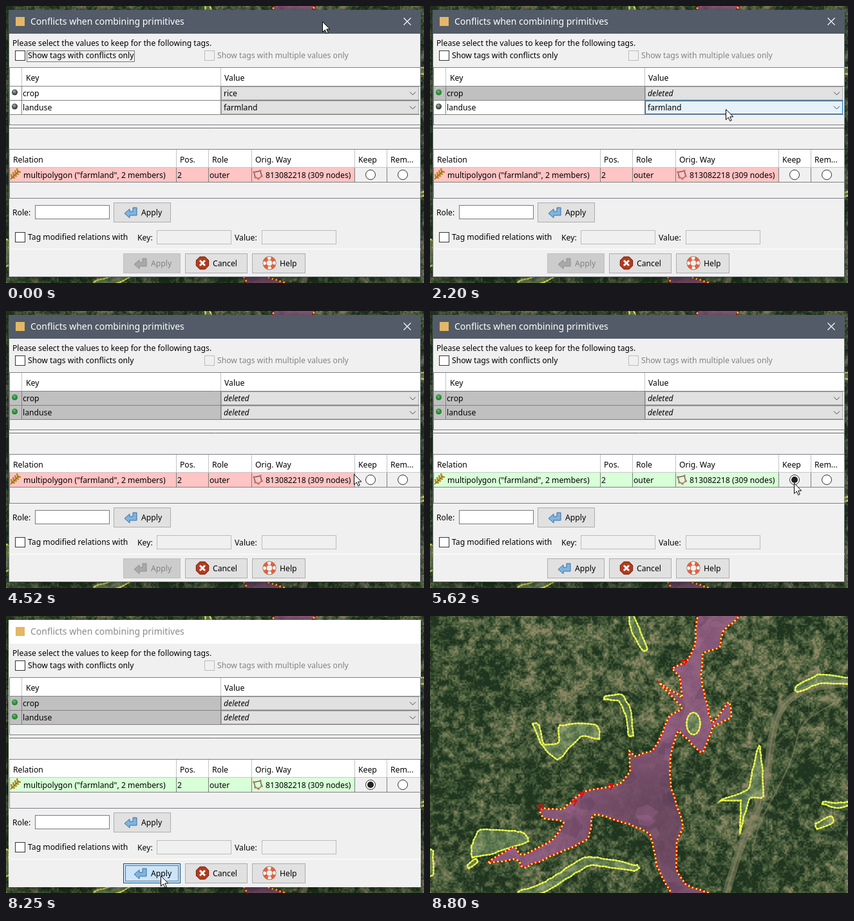
Write an HTML page with a canvas that moves like this. It is 649x430 px and loops after 9 s.

```html
<!DOCTYPE html>
<html lang="en">
<head>
<meta charset="utf-8">
<title>Conflicts when combining primitives</title>
<style>
html, body { margin: 0; width: 100%; height: 100%; overflow: hidden; background: #465539; }
canvas { display: block; }
</style>
</head>
<body>
<canvas id="stage" width="649" height="430"></canvas>
<script>
const W = 649, H = 430, LOOP = 9000, STEP = LOOP / 82;
const stage = document.getElementById('stage').getContext('2d');
const layer = () => Object.assign(document.createElement('canvas'), { width: W, height: H }).getContext('2d');
const land = layer(), dlg = layer();
const FONT = '12.2px "Noto Sans", sans-serif';
const BLUE = '#0078d7';

// ---------- Landscape ----------
function hash(x, y) {
  const s = Math.sin(x * 127.1 + y * 311.7) * 43758.5453;
  return s - Math.floor(s);
}
function noise(x, y) {
  const i = Math.floor(x), j = Math.floor(y);
  let u = x - i, v = y - j;
  u *= u * (3 - 2 * u);
  v *= v * (3 - 2 * v);
  const a = hash(i, j), b = hash(i + 1, j), c = hash(i, j + 1), d = hash(i + 1, j + 1);
  return a + (b - a) * u + (c - a + (a - b - c + d) * u) * v;
}
const shades = [[32, 53, 31], [76, 97, 61], [142, 136, 102]];   // trees, grass, soil

function paintLand() {
  const img = land.createImageData(W, H);
  for (let y = 0, p = 0; y < H; y++) for (let x = 0; x < W; x++, p += 4) {
    const v = .14 * noise(x / 80, y / 80) + .2 * noise(x / 26, y / 26)
            + .36 * noise(x / 8, y / 8) + .3 * noise(x / 2.5, y / 2.5);
    const t = Math.max(0, Math.min(1.99, (v - .35) * 4.6)), i = Math.floor(t);
    for (let c = 0; c < 3; c++) img.data[p + c] = shades[i][c] + (shades[i + 1][c] - shades[i][c]) * (t - i);
    img.data[p + 3] = 255;
  }
  land.putImageData(img, 0, 0);
  const road = (d, width) => {
    land.lineWidth = width;
    land.strokeStyle = 'rgba(140,135,105,.5)';
    land.stroke(new Path2D(d));
  };
  const river = 'M649 104C590 108 552 118 538 160S528 240 518 275S486 340 478 370L460 430';
  road(river, 12);
  road(river, 3);
  road('M649 125C600 150 575 160 570 190S545 260 528 290S505 340 500 370', 2);
  road('M250 308C290 305 330 330 345 350S352 390 375 430', 4);
}

const points = s => s.split(',').map(p => p.trim().split(' ').map(Number));

// Closed curve through the points, with small seeded bumps
function outline(pts, wobble = 1) {
  const path = new Path2D(), at = i => pts[(i + pts.length) % pts.length];
  pts.forEach((p, i) => {
    const q = at(i + 1), n = Math.ceil(Math.hypot(q[0] - p[0], q[1] - p[1]) / 7);
    for (let s = 0; s < n; s++) {
      const u = s / n, u2 = u * u, u3 = u2 * u;
      path.lineTo(...[0, 1].map(a =>
        p[a] * (2 * u3 - 3 * u2 + 1) + q[a] * (3 * u2 - 2 * u3)
        + .25 * (q[a] - at(i - 1)[a]) * (u3 - 2 * u2 + u) + .25 * (at(i + 2)[a] - p[a]) * (u3 - u2)
        + wobble * (hash(i + a * 50, s) * 2 - 1)));
    }
  });
  path.closePath();
  return path;
}
// Narrow field along a spine
function ribbon(width, spine) {
  const pts = points(spine), last = pts.length - 1;
  const side = sign => pts.map(([x, y], i) => {
    const a = pts[Math.max(0, i - 1)], b = pts[Math.min(last, i + 1)];
    const dx = b[0] - a[0], dy = b[1] - a[1], w = sign * width * (i % last ? 1 : .6) / Math.hypot(dx, dy);
    return [x - dy * w, y + dx * w];
  });
  return outline([...side(1), ...side(-1).reverse()]);
}

const bank = outline(points(`418 -3, 411 47, 397 72, 376 81, 387 95, 391 126, 356 104, 391 142, 372 155, 348 206,
  318 217, 309 209, 310 243, 292 261, 240 273, 205 299, 172 299, 175 313, 207 320, 190 348, 142 371, 130 358,
  90 383, 135 378, 147 390, 243 347, 254 309, 300 320, 342 340, 352 385, 378 433, 440 433, 400 418, 383 395,
  383 350, 393 325, 374 262, 374 220, 386 179, 422 212, 440 172, 467 158, 464 134, 438 165, 422 100, 424 58,
  450 48, 454 25, 482 -3`));
const pond = new Path2D();
pond.ellipse(409, 167, 10.5, 17, 0, 0, 7);
const fields = [
  ribbon(6, '312 -3, 319 22, 334 53'),
  ribbon(5, '271 127, 296 127, 308 152, 312 187'),
  outline(points('160 168, 170 170, 177 200, 200 196, 201 170, 257 168, 263 192, 235 186, 198 223, 172 198')),
  outline(points('65 358, 78 332, 140 335, 152 350, 105 366, 66 375')),
  ribbon(5, '59 390, 73 379'),
  ribbon(7, '138 432, 180 420, 245 381, 320 391'),
  outline(points('512 202, 518 280, 496 283, 481 336, 482 287, 450 287, 493 270, 500 240')),
  ribbon(7, '569 115, 603 98, 652 101'),
  ribbon(4, '610 290, 636 294, 652 291'),
  ribbon(8, '600 327, 625 315'),
  ribbon(6, '1 365, 1 402')
];

function dotted(path, color, gap) {
  stage.lineWidth = 2;
  stage.strokeStyle = color;
  stage.stroke(path);
  stage.lineWidth = 2.6;
  stage.strokeStyle = '#ffff3c';
  stage.setLineDash([2.4, gap]);
  stage.stroke(path);
  stage.setLineDash([]);
}

function drawField(path) {
  stage.fillStyle = 'rgba(165,200,140,.35)';
  stage.fill(path);
  dotted(path, '#d4ec62', 2.5);
}

function drawMap(merged) {
  const c = stage;
  c.drawImage(land.canvas, 0, 0);
  fields.forEach(drawField);
  c.save();
  c.clip(bank);
  const tint = c.createRadialGradient(355, 325, 40, 355, 325, 160);
  tint.addColorStop(0, 'rgba(114,72,102,.88)');
  tint.addColorStop(1, 'rgba(150,92,134,.85)');
  c.fillStyle = tint;
  c.fillRect(0, 0, W, H);
  for (let i = 0; i < 110; i++) {
    const x = 90 + hash(i, 1) * 390, y = hash(i, 2) * H, r = 8 + hash(i, 3) * 16;
    c.fillStyle = hash(i, 4) < .5 ? 'rgba(175,112,158,.25)' : 'rgba(80,54,82,.25)';
    c.beginPath();
    for (let a = 0; a < 5; a++) {
      const q = a * 1.257, s = r * (.6 + hash(i, a + 5) * .6);
      c.lineTo(x + s * Math.cos(q), y + s * .8 * Math.sin(q));
    }
    c.fill();
  }
  if (!merged) {
    c.fillStyle = 'rgba(190,85,60,.5)';
    c.fillRect(80, 255, 216, 140);
    c.strokeStyle = '#f00';
    c.lineWidth = 2;
    c.strokeRect(296, 255, 0, 65);
  }
  c.restore();
  c.save();
  c.clip(pond);
  c.drawImage(land.canvas, 0, 0);
  c.restore();
  drawField(pond);
  dotted(bank, '#f00000', 3.8);
  c.strokeStyle = '#f00000';
  c.lineWidth = 2;
  for (const p of ['399 68', '239 274', '228 286', '285 261', '175 293']) c.stroke(new Path2D(`M${p}l-10 2m10-2l-5 9`));
}

// ---------- Dialog ----------
function text(s, x, y, color = '#000', style = '') {
  dlg.font = style + ' ' + FONT;
  dlg.fillStyle = color;
  dlg.fillText(s, x, y);
}
function rect(x, y, w, h, fill, border) {
  dlg.fillStyle = fill;
  dlg.fillRect(x, y, w, h);
  if (!border) return;
  dlg.strokeStyle = border;
  dlg.lineWidth = 1;
  dlg.strokeRect(x + .5, y + .5, w - 1, h - 1);
}
function line(d, color, width = 1) {
  dlg.strokeStyle = color;
  dlg.lineWidth = width;
  dlg.stroke(new Path2D(d));
}
function focusRing(x, y, w, h) {
  dlg.setLineDash([1, 1]);
  line(`M${x + .5} ${y + .5}h${w}v${h}h${-w}z`, '#000');
  dlg.setLineDash([]);
}
function disc(x, y, r, fill, border, width = 1) {
  dlg.beginPath();
  dlg.arc(x, y, r, 0, 7);
  dlg.fillStyle = fill;
  dlg.fill();
  if (border) {
    dlg.strokeStyle = border;
    dlg.lineWidth = width;
    dlg.stroke();
  }
}
function checkbox(x, y, label, off) {
  rect(x, y, 16, 16, off ? '#f0f0f0' : '#fff', off ? '#bcbcbc' : '#333');
  text(label, x + 20, y + 12, off ? '#838383' : '#000');
}
function ball(x, y, on) {
  const g = dlg.createRadialGradient(x - 1, y - 2, 0, x, y, 5);
  g.addColorStop(0, on ? '#6cbf6c' : '#b4beb4');
  g.addColorStop(.9, on ? '#147d28' : '#26332a');
  disc(x, y, 4.5, g);
}
const looks = {
  normal: ['#e1e1e1', '#adadad'], off: ['#cccccc', '#bfbfbf'],
  hover: ['#e5f1fb', BLUE], down: ['#cce4f7', '#005499']
};
function button(x, y, w, label, icon, look = 'normal') {
  rect(x, y, w, 31, ...looks[look]);
  icon(x + 27, y + 15, look === 'off');
  text(label, x + 43, y + 20, look === 'off' ? '#838383' : '#000');
}
function returnIcon(x, y, off) {
  const p = new Path2D(`M${x - 10} ${y + 2}l8-7v4h5v-6h6v12h-11v4z`);
  dlg.fillStyle = off ? '#a9a9a9' : '#7db4e0';
  dlg.fill(p);
  dlg.strokeStyle = off ? '#8f8f8f' : '#3b6f9e';
  dlg.lineWidth = 1;
  dlg.stroke(p);
}
function cancelIcon(x, y) {
  dlg.beginPath();
  for (let i = 0; i < 8; i++) {
    const a = (i + .5) * Math.PI / 4;
    dlg.lineTo(x + 10.5 * Math.cos(a), y + 10.5 * Math.sin(a));
  }
  dlg.closePath();
  dlg.fillStyle = '#b5391c';
  dlg.fill();
  dlg.strokeStyle = '#6e1c0c';
  dlg.lineWidth = 1;
  dlg.stroke();
  line(`M${x - 4} ${y - 4}l8 8m0-8l-8 8`, '#fff', 3);
}
function helpIcon(x, y) {
  disc(x, y, 7.5, '#f0f0f0', '#a04a30', 6);
  disc(x, y, 7.5, 'transparent', '#fff', 4.5);
  dlg.strokeStyle = '#e2613c';
  dlg.lineWidth = 5;
  for (let i = 0; i < 4; i++) {
    dlg.beginPath();
    dlg.arc(x, y, 7.5, i * Math.PI / 2 + .3, i * Math.PI / 2 + 1.2);
    dlg.stroke();
  }
}
function radio(x, on) {
  disc(x, 262, 7.5, '#fff', '#333');
  if (on) disc(x, 262, 5, '#222');
}
function wheatIcon(x, y) {
  for (let i = 0; i < 4; i++) line(`M${x - 5 + i * 3} ${y + 4 - i * 3}l-1-5m1 5l5 1`, '#b98a1c', 2.5);
  line(`M${x - 7} ${y + 7}l13-13`, '#8a6414', 1.5);
}
function wayIcon(x, y) {
  const pts = points('-6 -4, 4 -6, 6 2, 1 6, -4 4').map(([a, b]) => [x + a, y + b]);
  line(`M${pts.join('L')}Z`, '#222');
  for (const [a, b] of pts) rect(a - 1.5, b - 1.5, 3, 3, '#fff', '#c33a28');
}

// state: '' untouched, 'edit' selected, 'deleted' value removed
function tagRow(y, key, value, state, hot) {
  const edit = state === 'edit', gone = state === 'deleted';
  rect(6, y, 327, 21, edit ? BLUE : gone ? '#c0c0c0' : '#fff');
  line(`M24.5 ${y}v21M333.5 ${y}v21M6 ${y + 21.5}H642`, '#808080');
  ball(13.5, y + 9, state);
  text(key, 26, y + 15, edit ? '#fff' : '#000');
  const hover = !state && hot(334, y, 307, 21);
  rect(334, y, 307, 21, ...edit ? ['#fff', BLUE] : looks[hover ? 'hover' : 'normal']);
  if (edit) rect(621, y, 20, 21, '#cce4f7', BLUE);
  text(gone ? 'deleted' : value, edit ? 337 : 338, y + 15, '#000', gone ? 'italic' : '');
  line(`M627 ${y + 8.5}l4.5 4.5 4.5-4.5`, '#444');
}
function dropdown(y, value, cursorY) {
  const second = cursorY >= y + 18;
  rect(334, y, 307, 34, '#fff', '#000');
  rect(335, y + (second ? 17 : 1), 305, 16, BLUE);
  text(value, 335.5, y + 14, second ? '#000' : '#fff');
  text('none', 335.5, y + 30, second ? '#fff' : '#000', 'italic bold');
}

function drawDialog(k) {
  const fading = k >= 75, kept = k >= 48, pressed = k >= 71, cursorY = cursorAt(k)[1];
  const [hx, hy] = cursorAt(k - 1);   // hover lags one step
  const hot = (x, y, w, h) => hx >= x && hx < x + w && hy >= y && hy < y + h;
  dlg.clearRect(0, 0, W, H);
  rect(4, 6, 640, 415, '#f0f0f0', fading ? '#f0f0f0' : '#5a626c');
  rect(4, 6, 640, 37, fading ? '#fff' : '#525b67');
  rect(15, 17, 14, 14, '#e3b766');
  dlg.font = '14px "Noto Sans", sans-serif';
  dlg.fillStyle = fading ? '#8a8a8a' : '#fff';
  dlg.fillText('Conflicts when combining primitives', 38, 29);
  line('M617.5 18.5l11 11m0-11l-11 11', '#fff', 1.2);

  text('Please select the values to keep for the following tags.', 10, 62);
  checkbox(14, 69, 'Show tags with conflicts only');
  checkbox(308, 69, 'Show tags with multiple values only', true);
  if (k < 8) focusRing(32, 69, 167, 17);

  rect(5, 95, 639, 90, '#f0f0f0', '#7a8088');
  rect(6, 96, 637, 28, '#fff');
  line('M6 124.5H643', '#808080');
  line('M24.5 96V124M333.5 96V124', '#c4c4c4');
  text('Key', 31, 116);
  text('Value', 339, 116);
  tagRow(125, 'crop', 'rice', k < 8 ? '' : k < 16 ? 'edit' : 'deleted', hot);
  tagRow(147, 'landuse', 'farmland', k < 25 ? '' : k < 36 ? 'edit' : 'deleted', hot);
  line('M5 189.5H644', '#6e6e6e');

  rect(5, 222, 639, 77, '#f0f0f0', '#7a8088');
  rect(6, 223, 637, 28, '#fff');
  rect(6, 251, 535, 22, kept ? '#d8ffd8' : '#ffc4c4');
  line('M6 250.5H643', '#c8c8c8');
  const columns = { Relation: 5, 'Pos.': 264, Role: 314, 'Orig. Way': 381, Keep: 541, 'Rem...': 591 };
  for (const [name, x] of Object.entries(columns)) {
    text(name, x + 6, 243);
    line(`M${x + .5} 223v28`, '#c4c4c4');
    line(`M${x + .5} 251v22`, '#808080');
  }
  line('M6 273.5H643', '#808080');
  wheatIcon(14, 262);
  wayIcon(391, 262);
  text('multipolygon ("farmland", 2 members)', 27, 267);
  text('2', 266, 267);
  text('outer', 316, 267);
  text('813082218 (309 nodes)', 403, 267);
  radio(566, kept);
  radio(616);

  text('Role:', 10, 325);
  rect(45, 309, 116, 22, '#fff', '#7a7a7a');
  button(167, 305, 89, 'Apply', returnIcon);
  checkbox(14, 351, 'Tag modified relations with');
  text('Key:', 204, 364);
  rect(234, 348, 116, 22, '#f0f0f0', '#bcbcbc');
  text('Value:', 355, 364);
  rect(397, 348, 116, 22, '#f0f0f0', '#bcbcbc');
  line('M5 377.5H644', '#fff');

  const look = (x, w) => hot(x, 384, w, 31) ? 'hover' : 'normal';
  button(182, 384, 89, 'Apply', returnIcon, !kept ? 'off' : pressed ? 'down' : look(182, 89));
  button(278, 384, 97, 'Cancel', cancelIcon, look(278, 97));
  button(382, 384, 83, 'Help', helpIcon, look(382, 83));
  if (pressed) focusRing(185, 387, 82, 24);
  if (k >= 9 && k < 16) dropdown(146, 'rice', cursorY);
  if (k >= 26 && k < 36) dropdown(168, 'farmland', cursorY);
}

// ---------- Animation ----------
// Cursor moves: first step, last step, goal
const moves = [[1, 5, 472, 134], [10, 12, 471, 158], [12, 13, 470, 167], [18, 24, 453, 156], [27, 29, 437, 185],
  [30, 34, 434, 191], [38, 44, 565, 267], [59, 68, 242, 406], [74, 76, 239, 402]];
const arrow = new Path2D('M.5.5V16.5L4.2 13 6.8 18.6 9.2 17.5 6.7 12H11.8Z');

function cursorAt(k) {
  let x = 491, y = 24;
  for (const [from, to, gx, gy] of moves) {
    const u = Math.max(0, Math.min(1, (k - from) / (to - from))), e = 1 - (1 - u) ** 2.4;
    x += (gx - x) * e;
    y += (gy - y) * e;
  }
  return [Math.round(x), Math.round(y)];
}

let shown = -1;
function frame(now) {
  requestAnimationFrame(frame);
  const k = Math.floor(now % LOOP / STEP + .1);
  if (k === shown) return;
  shown = k;
  const closed = k >= 79, fade = Math.max(0, k - 75);
  drawMap(closed);
  if (closed) return;
  drawDialog(k);
  const scale = 1 - .01 * fade;
  stage.save();
  stage.globalAlpha = Math.max(0, 1 - .35 * fade);
  stage.translate(324, 214);
  stage.scale(scale, scale);
  stage.translate(-324, -214);
  if (!fade) {
    stage.shadowColor = 'rgba(0,0,0,.55)';
    stage.shadowBlur = 18;
    stage.shadowOffsetY = 3;
  }
  stage.drawImage(dlg.canvas, 0, 0);
  stage.restore();
  stage.save();
  stage.translate(...cursorAt(k));
  stage.fillStyle = '#fff';
  stage.fill(arrow);
  stage.strokeStyle = '#000';
  stage.lineWidth = 1;
  stage.stroke(arrow);
  stage.restore();
}

paintLand();
requestAnimationFrame(frame);
</script>
</body>
</html>
```
